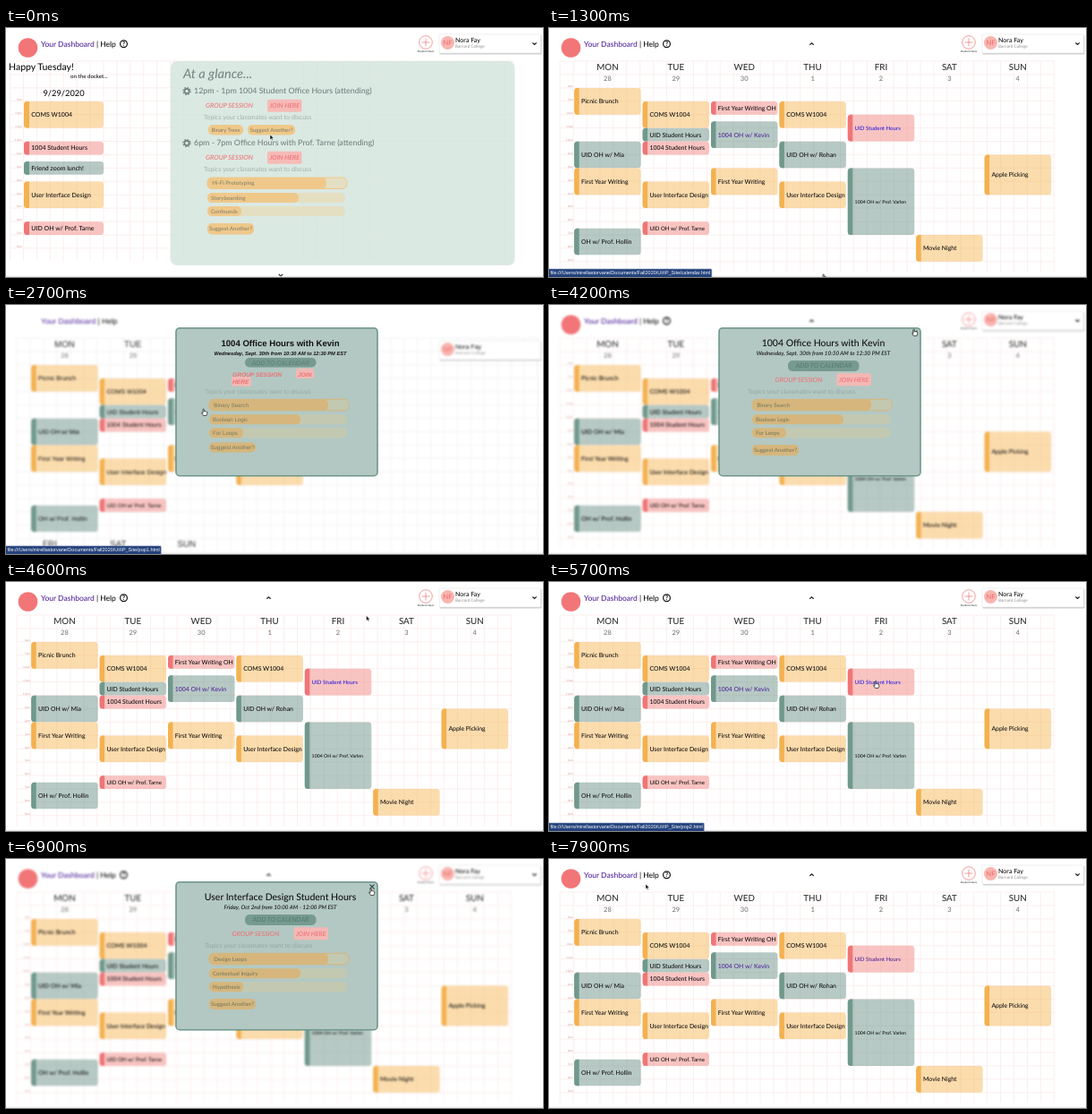
These frames come from a looping animation (600x278 px, 8 s). An HTML page:

```html
<!DOCTYPE html>
<html lang="en">
<head>
<meta charset="utf-8">
<title>Student planner</title>
<style>
html, body { margin: 0; width: 100%; height: 100%; overflow: hidden; background: #fff; }
svg { display: block; width: 600px; height: 278px; font-family: Lato, "Open Sans", sans-serif; font-weight: 500; text-rendering: geometricPrecision; }
.raw, #status { font-family: "Liberation Sans", Arial, sans-serif; }
.it { font-style: italic; }
.mid { text-anchor: middle; }
.bold { font-weight: 700; }
</style>
</head>
<body>
<svg id="stage" viewBox="0 0 600 278"></svg>
<script>
const HOUR = 14.92, DAY = 76.4;
const hourY = h => 66.8 + (h - 8) * HOUR;
// translucent body colour, solid edge colour
const COLORS = { o: ['#f7b95d', '#f4b150'], p: ['#f18985', '#f07576'], g: ['#6f9389', '#70998c'] };
const RED = '#ef7173', BLUE = '#2b20e0', PURPLE = '#51259a';

const text = (x, y, size, str, fill = '#111', cls = '', more = '') =>
  `<text x="${x}" y="${y}" font-size="${size}" fill="${fill}" class="${cls}" ${more}>${str}</text>`;
const rect = (x, y, w, h, fill, r = 0, more = '') =>
  `<rect x="${x}" y="${y}" width="${w}" height="${h}" rx="${r}" fill="${fill}" ${more}/>`;
const circle = (x, y, r, fill, more = '') => `<circle cx="${x}" cy="${y}" r="${r}" fill="${fill}" ${more}/>`;
const line = (d, color = '#222', w = 1) => `<path d="${d}" fill="none" stroke="${color}" stroke-width="${w}"/>`;
const chevron = (x, y, dir = 1) => line(`M${x - 2.2} ${y - dir}l2.2 ${2 * dir} 2.2 ${-2 * dir}`, '#222', 1.2);
const group = (id, body, cls = '') => `<g id="${id}" class="${cls}">${body}</g>`;

function grid(x, x2, y2, color) {
  let d = '';
  for (let gx = x; gx <= x2; gx += HOUR) d += `M${gx} 37V${y2}`;
  for (let gy = 37; gy <= y2; gy += HOUR) d += `M${x} ${gy}H${x2}`;
  return line(d, color, .7);
}

function hours(x, from, to) {
  let out = '';
  for (let h = from; h <= to; h++)
    out += text(x, hourY(h) - .6, 3.2, (h % 12 || 12) + (h < 12 ? 'am' : 'pm'), '#d9a5a2', '', 'text-anchor="end"');
  return out;
}

function event(x, w, bar, [color, from, to, label, size = 6.9, fill = '#111', id = '']) {
  const y = hourY(from) + .2, h = (to - from) * HOUR - .2, [body, edge] = COLORS[color];
  return rect(x, y, w, h, body, 3.5, 'fill-opacity=".5"') +
    `<path d="M${x + bar} ${y}v${h}h${3.5 - bar}q-3.5 0-3.5-3.5v${7 - h}q0-3.5 3.5-3.5z" fill="${edge}"/>` +
    text(x + bar + 2.3, y + h / 2 + 2.4, size, label, fill, '', id && `id="${id}"`);
}

const profile = y =>
  rect(484.5, y + 1, 114, 21.5, '#bbb', 1, 'opacity=".7"') + rect(484, y, 113.5, 21, '#fff', 1, 'stroke="#ddd" stroke-width=".5"') +
  circle(493.5, y + 9.5, 7.5, '#f8b5af') + text(493.5, y + 12.3, 7.5, 'NF', RED, 'mid') +
  text(502, y + 9, 7.1, 'Nora Fay') + text(502, y + 15, 4.7, 'Barnard College', '#999');

const brand = text(39, 20.5, 8.5, `<tspan fill="${PURPLE}">Your Dashboard</tspan> | Help`);

const header = circle(24.5, 22, 10.8, '#f27678') + brand +
  circle(131.5, 17.7, 3.9, 'none', 'stroke="#111" stroke-width="1.2"') + text(131.5, 20.2, 6.8, '?', '#111', 'mid bold') +
  circle(469, 16, 7.3, 'none', `stroke="${RED}" stroke-width=".7"`) + line('M469 11.5v9M464.5 16h9', RED, .7) +
  text(469, 27, 2.9, 'Student Hours', '#333', 'mid') + profile(7) + chevron(590.5, 17.5);

const gear = y => circle(202, y, 2.6, 'none', 'stroke="#71827f" stroke-width="1.6"') +
  circle(202, y, 4, 'none', 'stroke="#71827f" stroke-width="1.3" stroke-dasharray="1.7 1.442"');

const join = (x, y, fill) => text(x, y, 7.3, 'GROUP SESSION', RED, 'it') +
  rect(x + 69, y - 9.2, 38.5, 14, fill, 2) + text(x + 71.5, y, 7.1, 'JOIN HERE', RED, 'it');

const pill = (x, y, w, h, label, fill, ink, size = 6.2) =>
  rect(x, y, w, h, fill, 5) + text(x + w / 2, y + h / 2 + 2.2, size, label, ink, 'mid');

// Poll results: the first, longest bar carries an outline.
function poll(x, y, labels, back, fill, ink, size = 6.2) {
  return labels.map((label, i) => {
    const h = i ? 11 : 12.5, top = y + [0, 17, 32][i];
    return rect(x, top, i ? 154 : 156, h, back, 5, i ? '' : `stroke="${fill}" stroke-width="1"`) +
      rect(x, top, [133, 102, 38][i], h, fill, 5) + text(x + (i ? 4 : 5.3), top + h / 2 + 2.2, size, label, ink);
  }).join('');
}

const session = (y, title) => gear(y - 1.5) + text(210, y + 1, 8.85, title, '#71827f') +
  join(223, y + 17, '#f6bab7') + text(221, y + 30, 7.1, 'Topics your classmates want to discuss', '#a4b4b0');

const AMBER = '#efc88a', AMBER_INK = '#85816a';
const dash = grid(4.5, 568, 260, '#fbe9e7') + hours(18, 9, 20) +
  text(3, 47, 10.5, 'Happy Tuesday!') + text(72, 56, 6.15, 'on the docket...') + text(64.5, 76, 9.3, '9/29/2020', '#111', 'mid') +
  [['o', 9, 11, 'COMS W1004', 7], ['p', 12, 13, '1004 Student Hours', 7], ['g', 13.5, 14.5, 'Friend zoom lunch!', 7],
   ['o', 15, 17, 'User Interface Design', 7], ['p', 18, 19, 'UID OH w/ Prof. Tarne', 7]].map(e => event(20, 89, 6, e)).join('') +
  rect(184, 37, 384.5, 228, '#d5e5df', 7, 'fill-opacity=".85"') + text(198, 56, 14.5, 'At a glance...', '#778986', 'it') +
  session(72, '12pm - 1pm 1004 Student Office Hours (attending)') +
  pill(226, 108, 39, 11.5, 'Binary Trees', AMBER, AMBER_INK, 6) + pill(270, 108, 53, 11.5, 'Suggest Another?', AMBER, AMBER_INK) +
  session(130, '6pm - 7pm Office Hours with Prof. Tarne (attending)') +
  poll(225, 167, ['Hi-Fi Prototyping', 'Storyboarding', 'Confounds'], '#e4dfc2', AMBER, AMBER_INK) +
  pill(225, 218, 52, 12.5, 'Suggest Another?', AMBER, AMBER_INK) + chevron(307, 276);

const WEEK = [
  ['MON', ['o', 8, 10, 'Picnic Brunch'], ['g', 12, 14, 'UID OH w/ Mia'], ['o', 14, 16, 'First Year Writing'], ['g', 18.5, 20.5, 'OH w/ Prof. Hollin']],
  ['TUE', ['o', 9, 11, 'COMS W1004'], ['g', 11, 12, 'UID Student Hours'], ['p', 12, 13, '1004 Student Hours'],
    ['o', 15, 17, 'User Interface Design'], ['p', 18, 19, 'UID OH w/ Prof. Tarne', 6.15]],
  ['WED', ['p', 9, 10, 'First Year Writing OH'], ['g', 10.5, 12.5, '1004 OH w/ Kevin', 6.9, PURPLE], ['o', 14, 16, 'First Year Writing']],
  ['THU', ['o', 9, 11, 'COMS W1004'], ['g', 12, 14, 'UID OH w/ Rohan'], ['o', 15, 17, 'User Interface Design']],
  ['FRI', ['p', 10, 12, 'UID Student Hours', 6.1, BLUE, 'link'], ['g', 14, 19, '1004 OH w/ Prof. Varlen', 5.25]],
  ['SAT', ['o', 19, 21, 'Movie Night']],
  ['SUN', ['o', 13, 16, 'Apple Picking']]
];
const DATES = [28, 29, 30, 1, 2, 3, 4];

const days = n => WEEK.slice(0, n).map(([name, ...events], i) => {
  const x = 28.2 + i * DAY;
  return text(x + 37.2, 47, 9.8, name, '#333', 'mid') + text(x + 37.2, 59.3, 7.5, DATES[i], '#777', 'mid') +
    events.map(e => event(x, 74.5, 5.5, e)).join('');
}).join('');

const calendar = grid(12.2, 565, 272, '#fbe9e7') + hours(27, 8, 21) + days(7) + chevron(293.5, 17.7, -1);

// Half-loaded page: fallback font, weekend wrapped below.
const loading = grid(12.2, 600, 278, '#eee') + brand + profile(40) + days(4) +
  ['FRI', 'SAT', 'SUN'].map((d, i) => text(49 + i * DAY, 270, 9.8, d, '#333', 'mid')).join('');

const POP_FILL = '#d6b67c', POP_BACK = '#c3c9b0', POP_INK = '#77795f';
function popup(title, when, topics, raw) {
  const y = raw ? 59 : 62, weight = raw ? ' bold' : '';
  const buttons = raw
    ? rect(324, 71, 20, 11, '#f0b9b5', 2) + rect(252, 80, 22, 11, '#f0b9b5', 2) +
      [[253, 79.5, 'GROUP SESSION'], [326, 79.5, 'JOIN'], [253, 87.5, 'HERE']].map(([bx, by, s]) => text(bx, by, 6.6, s, RED, 'it bold')).join('')
    : join(252.5, 85.5, '#f3b8b5');
  return rect(190, 25.7, 225, 165, '#b3c8c3', 4, 'stroke="#6d968a" stroke-width="1.6"') +
    text(306.5, 46, raw ? 9.6 : 10.5, title, '#111', 'mid' + weight) + text(306.5, 55.7, raw ? 5.7 : 6.3, when, '#111', 'mid it' + weight) +
    rect(267, y, 79.5, raw ? 10.5 : 12, '#769a8f', 5) + text(307, y + 8.3, raw ? 6.8 : 7.3, 'ADD TO CALENDAR', '#587b70', 'mid it') + buttons +
    text(222, 98.5, raw ? 6.8 : 7.1, 'Topics your classmates want to discuss', '#94aaa5') +
    poll(227, 105.3, topics, POP_BACK, POP_FILL, POP_INK) +
    pill(227, raw ? 153.5 : 156, 52, raw ? 11 : 12, 'Suggest Another?', POP_FILL, POP_INK) +
    (raw ? '' : line('M406.5 28.5l5 5m0-5l-5 5', '#34504f', 1.1));
}
const FIRST = ['1004 Office Hours with Kevin', 'Wednesday, Sept. 30th from 10:30 AM to 12:30 PM EST', ['Binary Search', 'Boolean Logic', 'For Loops']];
const SECOND = ['User Interface Design Student Hours', 'Friday, Oct 2nd from 10:00 AM - 12:00 PM EST', ['Design Loops', 'Contextual Inquiry', 'Hypothesis']];

const stage = document.getElementById('stage');
stage.innerHTML = rect(0, 0, 600, 278, '#fff') +
  group('page', header + group('dash', dash) + group('calendar', calendar)) +
  group('loading', loading, 'raw') + rect(0, 276.8, 600, .8, '#ddd') +
  group('pop0', popup(...FIRST, true), 'raw') + group('pop1', popup(...FIRST)) + group('pop2', popup(...SECOND)) +
  group('status', rect(-1, 269, 183, 10, '#24427c', 1, 'stroke="#8c9dbd" stroke-width=".6"') + text(1.5, 275.3, 5.5, '', '#fff')) +
  group('arrow', '<path d="M0 0v6.2l1.5-1.3 1 2.2 1.1-.5-1-2.1h2z" fill="#111" stroke="#fff" stroke-width=".5"/>') +
  group('hand', '<path d="M-1 .4q1-1.2 1.3.2v2.3q2.6-.1 3.9 1v2l-1 2.4h-3.6l-2.2-3q-.3-1.3 1.6-.3z" fill="#fff" stroke="#111" stroke-width=".8"/>');

const $ = id => document.getElementById(id);
const show = (id, on) => $(id).style.display = on ? '' : 'none';
const within = (t, a, b) => t >= a && t < b;

// time, x, y of the pointer
const PATH = [[0, 295, 119], [200, 296, 122], [900, 307, 275], [1500, 307, 275], [2300, 221, 116], [2700, 221, 116], [2900, 221, 116],
  [4000, 408, 27], [4400, 408, 27], [5300, 365, 111], [6000, 365, 111], [6700, 408, 33], [7100, 408, 33], [7800, 108, 28], [8000, 108, 28]];
const HAND = [[900, 1500], [2200, 2900], [3900, 4500], [5200, 6000], [6600, 7200]];
const LINKS = [[1000, 1500, 'calendar'], [2300, 2800, 'pop1'], [5300, 6000, 'pop2']];

function draw(now) {
  const t = Math.floor(now % 8000 / 100) * 100;
  const raw = within(t, 2700, 2800), one = within(t, 2800, 4400), two = within(t, 6000, 7100);
  show('page', !raw);
  show('loading', raw);
  show('dash', t < 1200);
  show('calendar', t >= 1200);
  show('pop0', raw);
  show('pop1', one);
  show('pop2', two);
  $('page').style.filter = one || two ? 'blur(1px)' : '';
  $('loading').style.filter = 'blur(1px)';
  $('link').setAttribute('fill', t < 6000 ? BLUE : PURPLE);

  const link = LINKS.find(([a, b]) => within(t, a, b));
  show('status', link);
  if (link) {
    const [bar, label] = $('status').children;
    label.textContent = `file:///Users/mirellastorvane/Documents/Fall2020/UI/IP_Site/${link[2]}.html`;
    bar.setAttribute('width', label.getComputedTextLength() + 4);
  }

  const i = PATH.findIndex(p => p[0] > t), [t0, x0, y0] = PATH[i - 1], [t1, x1, y1] = PATH[i];
  const u = (t - t0) / (t1 - t0), k = u * u * (3 - 2 * u);
  const hand = HAND.some(([a, b]) => within(t, a, b));
  for (const id of ['arrow', 'hand'])
    $(id).setAttribute('transform', `translate(${x0 + (x1 - x0) * k} ${y0 + (y1 - y0) * k}) scale(.9)`);
  show('hand', hand);
  show('arrow', !hand);
}

function tick() {
  draw(performance.now());
  requestAnimationFrame(tick);
}
tick();
</script>
</body>
</html>
```
